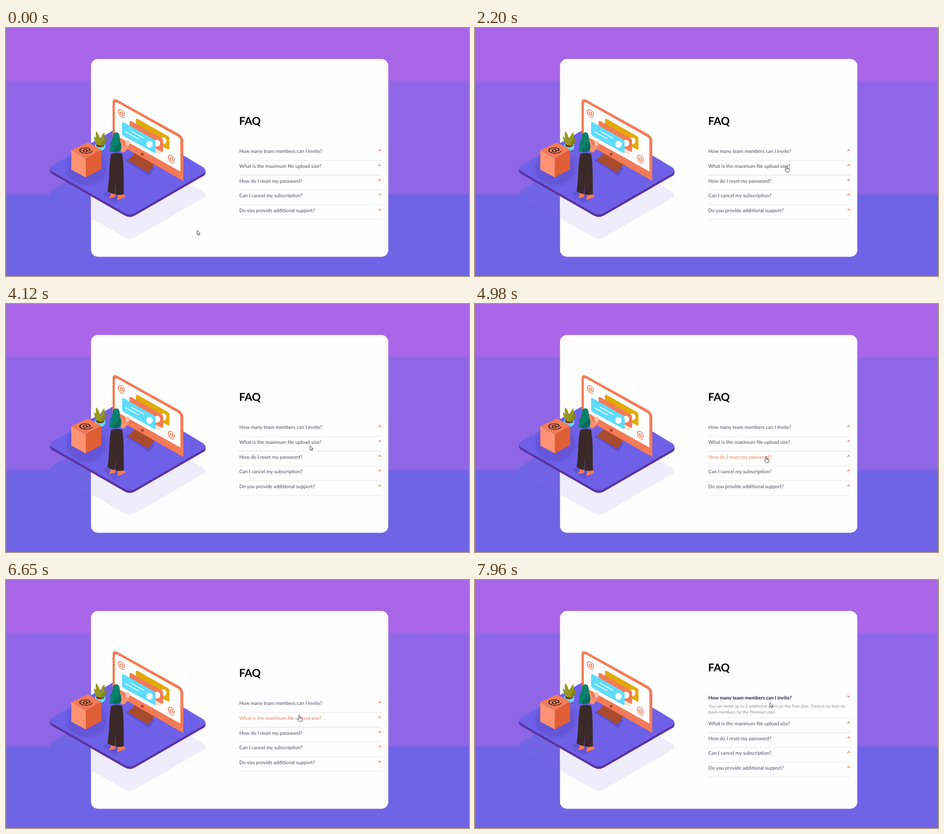
Recreate the animation shown at these times as an HTML page. Size 1021 by 548 pixels, loop 7.99 s.

```html
<!DOCTYPE html>
<html lang="en">
<head>
<meta charset="utf-8">
<title>FAQ accordion</title>
<style>
  html, body { margin: 0; width: 100%; height: 100%; overflow: hidden; background: #7064e6; }
  svg { display: block; width: 1021px; height: 548px; }
  text { font-family: Lato, "Open Sans", sans-serif; text-rendering: geometricPrecision; }

  :root { --ink: #4b4c5f; --hot: #f47b56; }
  .title { font-size: 24px; font-weight: 700; fill: #000; }
  .q { font-size: 10.82px; fill: var(--ink); }
  .open { font-size: 10.75px; font-weight: 700; fill: #1e1f36; }
  .answer { font-size: 9.2px; fill: #8b8b96; }
  .rule { fill: #e6e6ea; }
  .caret { fill: none; stroke: var(--hot); stroke-width: 1.6; }
  .at { font-weight: 700; text-anchor: middle; }

  .anim { animation: 7990ms linear infinite; }
  .up { animation-name: up; animation-timing-function: step-end; }
  .down { animation-name: down; animation-timing-function: step-end; }
  .closed { animation-name: closed; animation-timing-function: step-end; }
  .opened { animation-name: opened; animation-timing-function: step-end; }
  .open { animation-name: settle; }
  .r1 { animation-name: r1; }
  .r2 { animation-name: r2; }
  .r3 { animation-name: r3; }
  .r4 { animation-name: r4; }
  .r5 { animation-name: r5; }
  .cursor { animation-name: move; }
  .arrow { animation-name: arrow; animation-timing-function: step-end; }
  .hand { animation-name: hand; animation-timing-function: step-end; }

  /* the first answer opens */
  @keyframes up { 0% { transform: none } 96.6%, 100% { transform: translateY(-12px) } }
  @keyframes down { 0% { transform: none } 96.6%, 100% { transform: translateY(12px) } }
  @keyframes closed { 0% { opacity: 1 } 96.6%, 100% { opacity: 0 } }
  @keyframes opened { 0% { opacity: 0 } 96.6%, 100% { opacity: 1 } }
  @keyframes settle { 0%, 96.6% { fill: var(--hot) } 99%, 100% { fill: #1e1f36 } }

  /* hover colours */
  @keyframes r1 {
    0%, 29.8%, 39.8%, 85.5% { fill: var(--ink) }
    31%, 38.5%, 86.8%, 100% { fill: var(--hot) }
  }
  @keyframes r2 {
    0%, 27.6%, 29.9%, 44.5%, 47%, 52.5%, 62%, 80.7%, 84.8%, 100% { fill: var(--ink) }
    28.4%, 28.7%, 45.7%, 46.2%, 53.1%, 60.7%, 81.9%, 83.5% { fill: var(--hot) }
  }
  @keyframes r3 {
    0%, 61.2%, 70.8%, 79.5%, 81.2%, 100% { fill: var(--ink) }
    62.2%, 69.6%, 80%, 80.2% { fill: var(--hot) }
  }
  @keyframes r4 {
    0%, 71.3%, 77%, 78.4%, 80.2%, 100% { fill: var(--ink) }
    72.6%, 75.7%, 79%, 79.2% { fill: var(--hot) }
  }
  @keyframes r5 {
    0%, 76.2%, 79.3%, 100% { fill: var(--ink) }
    77.4%, 78.1% { fill: var(--hot) }
  }

  @keyframes move {
    0%, 5.9% { transform: translate(421px, 447px) }
    6.13% { transform: translate(440px, 443px) }
    6.6% { transform: translate(550px, 462px) }
    7.2%, 10.4% { transform: translate(631px, 489px) }
    11.8%, 20.5% { transform: translate(758px, 456px) }
    23%, 26.2% { transform: translate(734px, 347px) }
    27.5%, 27.7% { transform: translate(687px, 305px) }
    28.8% { transform: translate(673px, 293px) }
    30.7% { transform: translate(665px, 274px) }
    34.3%, 36.5% { transform: translate(660px, 272px) }
    41.5%, 41.9% { transform: translate(672px, 285px) }
    44.4% { transform: translate(671px, 300px) }
    46.9%, 50.4% { transform: translate(670px, 311px) }
    51.6% { transform: translate(670px, 313px) }
    53%, 57.2% { transform: translate(671px, 306px) }
    57.3%, 59.7% { transform: translate(672px, 306px) }
    62.2%, 63.8% { transform: translate(642px, 337px) }
    65%, 67.7% { transform: translate(642px, 339px) }
    73.1%, 74.7% { transform: translate(645px, 371px) }
    76.3% { transform: translate(646px, 400px) }
    77.4% { transform: translate(646px, 403px) }
    80.8% { transform: translate(645px, 310px) }
    83.2%, 83.5% { transform: translate(647px, 299px) }
    84.8%, 85% { transform: translate(648px, 280px) }
    88.2%, 92.2% { transform: translate(648px, 266px) }
    92.3%, 94.6% { transform: translate(649px, 266px) }
    94.8%, 100% { transform: translate(650px, 271px) }
  }
  @keyframes arrow {
    0%, 28.7%, 38.5%, 46.2%, 60.7%, 69.6%, 75.7%, 78.1%, 79.2%, 80.2%, 83.6%, 96.6%, 100% { opacity: 1 }
    27.4%, 29.8%, 44.5%, 52.5%, 61.2%, 71.3%, 76.2%, 78.4%, 79.5%, 80.7%, 85.5% { opacity: 0 }
  }
  @keyframes hand {
    0%, 28.7%, 38.5%, 46.2%, 60.7%, 69.6%, 75.7%, 78.1%, 79.2%, 80.2%, 83.6%, 96.6%, 100% { opacity: 0 }
    27.4%, 29.8%, 44.5%, 52.5%, 61.2%, 71.3%, 76.2%, 78.4%, 79.5%, 80.7%, 85.5% { opacity: 1 }
  }
</style>
</head>
<body>
<svg viewBox="0 0 1021 548">
  <defs>
    <linearGradient id="sky" gradientUnits="userSpaceOnUse" x1="0" y1="0" x2="0" y2="548">
      <stop offset=".208" stop-color="#a966e8"/>
      <stop offset=".221" stop-color="#8f67e6"/>
      <stop offset=".663" stop-color="#8f67e6"/>
      <stop offset=".676" stop-color="#7064e6"/>
    </linearGradient>
    <path id="slab" d="M100 305 L259 213 Q268 208 278 213 L435 308 Q444 315 436 321 L284 409 Q273 415 262 409 L100 316 Q94 310 100 305Z"/>
    <clipPath id="cardClip"><rect x="187.5" y="68.5" width="655.5" height="437" rx="15"/></clipPath>
    <path id="caret" class="caret" d="M-3 1.7 L0 -1.3 L3 1.7"/>
    <g id="note">
      <path d="M0 3 Q0 -1 4 1 L71 39 Q74 41 74 45 V66 Q74 70 70 68 L3 31 Q0 29 0 26Z"/>
      <ellipse cx="60.500" cy="49.500" rx="7" ry="7.500" fill="#fff"/>
    </g>
  </defs>

  <rect width="1021" height="548" fill="url(#sky)"/>
  <rect width="1" height="548" fill="#8d84a8"/>
  <rect width="2" height="1" fill="#2c6f86"/>

  <!-- card and slab shadow -->
  <use href="#slab" y="54" fill="#7165e6"/>
  <rect x="187.500" y="68.500" width="655.500" height="437" rx="15" fill="#fefefe"/>
  <g clip-path="url(#cardClip)"><use href="#slab" y="54" fill="#efedfb"/></g>

  <!-- slab -->
  <use href="#slab" y="5.500" fill="#5a32a0"/>
  <path d="M97 310V315L100 321.500H108V310ZM440 315V321L436 326.500H428V315Z" fill="#5a32a0"/>
  <use href="#slab" fill="#6e61e7"/>
  <g fill="#5b4cc9">
    <ellipse cx="178" cy="309" rx="48" ry="43" opacity=".18"/>
    <ellipse cx="177" cy="309" rx="43" ry="38" opacity=".4"/>
    <path d="M263 293 L282 283 L328 310 L316 327Z" opacity=".75"/>
    <path d="M214 366 L225 358 L260 376 L239 388Z" opacity=".6"/>
    <ellipse cx="202" cy="270" rx="15" ry="7" opacity=".5"/>
  </g>

  <!-- monitor -->
  <path d="M284 277 L328 300 L314 320 L268 292Z" fill="#a84a2d"/>
  <path d="M235 163 Q236 154 246 159 L381 234 Q391 240 391 250 V338 L235 249Z" fill="#f47b56"/>
  <path d="M240 168 Q240 162 246 165 L379 240 Q384.500 243 384.500 250 V317 L240 236Z" fill="#fefefe"/>
  <path d="M329 263 L341 270 L340 280 L329 275Z" fill="#fbe2cc"/>
  <use href="#note" x="286.500" y="200" fill="#e2aa08"/>
  <use href="#note" x="272.500" y="205" fill="#f47b56"/>
  <use href="#note" x="256" y="207.500" fill="#5fdcfc"/>
  <path d="M276 228 L304 243.500M264 229.500 L292 245" stroke="#fff" stroke-width="1.700" stroke-linecap="round"/>
  <circle cx="300.500" cy="279" r="3.300" fill="#a84a2d"/>
  <g fill="#f47b56" font-size="21">
    <text class="at" transform="matrix(.95 .45 0 1 254.500 194.500)">@</text>
    <text class="at" transform="matrix(.95 .45 0 1 364.500 295.500)">@</text>
  </g>

  <!-- plant -->
  <path d="M196 260 Q197 272 208 272 Q219 271 219 260Z" fill="#5fdcfc"/>
  <ellipse cx="207.500" cy="259.500" rx="11.500" ry="6" fill="#5fdcfc"/>
  <ellipse cx="207.500" cy="259" rx="9" ry="4.500" fill="#6e3427"/>
  <g fill="#98991d">
    <path d="M205 260 Q194 252 194 239 Q202 244 207 258Z"/>
    <path d="M206 259 Q195 242 199 228 Q208 237 209 259Z"/>
    <path d="M207 259 Q206 240 217 230 Q219 248 211 260Z"/>
    <path d="M209 260 Q212 246 222 242 Q222 255 212 261Z" fill="#85861a"/>
  </g>

  <!-- box -->
  <path d="M144 270 L181 253 L210 269 L177 288Z" fill="#f47b56"/>
  <path d="M144 270 L176 288 V330 L144 313Z" fill="#fe9272"/>
  <path d="M176 288 L210 269 V312 L176 330Z" fill="#df5e35"/>
  <text class="at" font-size="28" fill="#3b2929" transform="matrix(1 -.36 .76 .5 181 275)">@</text>

  <!-- woman -->
  <g fill="#f47b56">
    <path d="M230 359 L240 361 L241 372 L237 374 L228 376 Q226 373 231 369Z"/>
    <path d="M246 365 L256 365 L263 371 L262 374 L247 380 Q244 378 247 374Z"/>
  </g>
  <path d="M232 278 Q244 274 256 278 C261 303 259 335 260 367 Q250 371 241 367 L242.500 340 L240 367 Q231 366 224 360 C229 332 226 303 232 278Z" fill="#3b2929"/>
  <path d="M251 248 Q258 251 260 263 L267 254 L272 258 Q267 271 260 275 Q254 276 251 268Z" fill="#fe9272"/>
  <path d="M264 258 L263 249 L266 251 L268 247 L270 250 L273 250 L272 258 L268 261Z" fill="#ffc0a9"/>
  <path d="M236 234 Q242 228 248 232 Q252 239 251 248 Q257 260 253 270 Q245 278 228 272 Q231 261 230 255 Q236 246 236 234Z" fill="#0a806a"/>
  <path d="M236 266 Q246 264 251 250 Q256 262 252 271 Q243 276 236 273Z" fill="#076d5c"/>

  <!-- accordion -->
  <g class="anim up">
    <text class="title" x="514" y="213.500">FAQ</text>
    <g class="anim closed">
      <text class="q anim r1" x="514.500" y="276.300">How many team members can I invite?</text>
      <use href="#caret" x="824" y="270"/>
    </g>
    <g class="anim opened">
      <text class="anim open" x="514.500" y="276">How many team members can I invite?</text>
      <use href="#caret" transform="translate(824 269.500) scale(1 -1)"/>
      <g class="answer">
        <text x="514.500" y="294">You can invite up to 2 additional users on the Free plan. There is no limit on</text>
        <text x="514.500" y="306.500">team members for the Premium plan.</text>
      </g>
    </g>
  </g>
  <g class="anim down">
    <rect class="rule" x="514.500" y="292" width="313.500" height="1"/>
    <text class="q anim r2" x="514.500" y="309">What is the maximum file upload size?</text>
    <use href="#caret" x="824" y="303"/>
    <rect class="rule" x="514.500" y="324.500" width="313.500" height="1" style="fill:#d8d8dd"/>
    <text class="q anim r3" x="514.500" y="341.500">How do I reset my password?</text>
    <use href="#caret" x="824" y="335.700"/>
    <rect class="rule" x="514.500" y="357.500" width="313.500" height="1"/>
    <text class="q anim r4" x="514.500" y="374">Can I cancel my subscription?</text>
    <use href="#caret" x="824" y="368.300"/>
    <rect class="rule" x="514.500" y="390" width="313.500" height="1"/>
    <text class="q anim r5" x="514.500" y="407.300">Do you provide additional support?</text>
    <use href="#caret" x="824" y="401.300"/>
    <rect class="rule" x="514.500" y="422.500" width="313.500" height="1"/>
  </g>

  <g class="anim cursor" fill="#fff" stroke="#26262c" stroke-width=".9" stroke-linejoin="round">
    <path class="anim arrow" d="M.500 0V9.600L2.700 7.700 4.200 11 5.700 10.400 4.300 7.200H7.200Z"/>
    <path class="anim hand" d="M-1.300 8V.900a1.300 1.300 0 0 1 2.600 0V4.600l3.500.700q1.300.300 1.300 1.600v2.600L5 13.600H0L-3.400 9.300q-.600-1.300.500-1.700 1-.200 1.600.900zM1.300 4.600V7M3.200 5V7.200"/>
  </g>
</svg>
</body>
</html>
```
